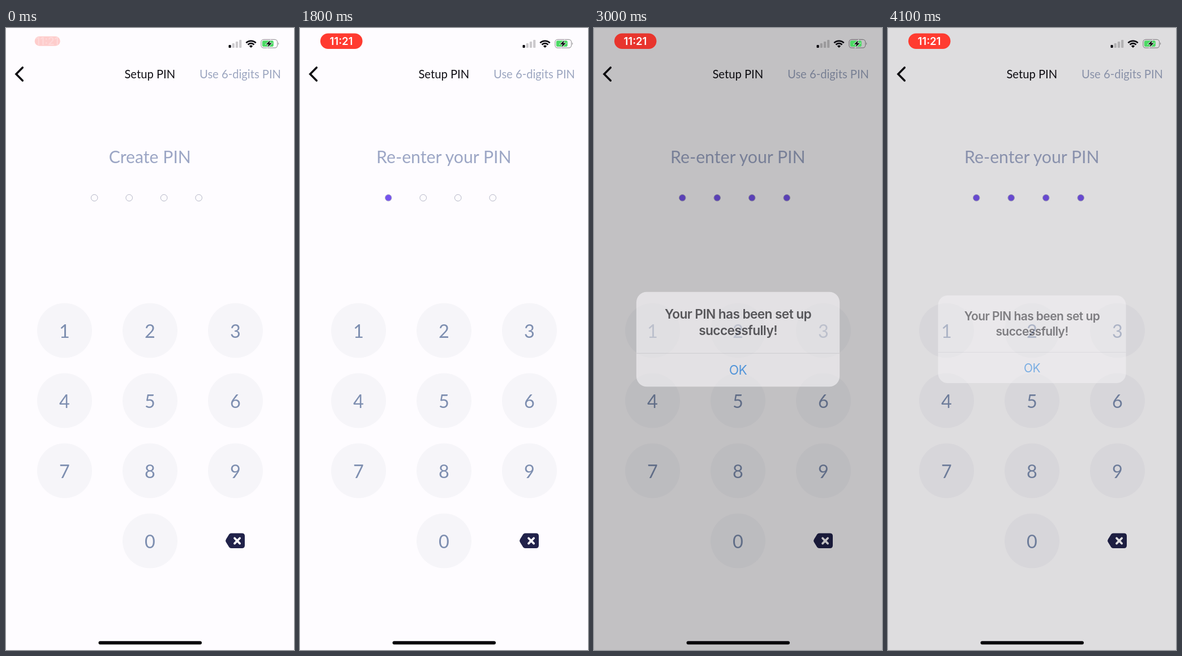
These frames come from a looping animation (509x1100 px, 4200 ms). An HTML page:

```html
<!DOCTYPE html>
<html lang="en">
<head>
<meta charset="utf-8">
<title>PIN setup</title>
<style>
  html, body { margin: 0; width: 100%; height: 100%; overflow: hidden; background: #fefcff; }
  svg { display: block; width: 509px; height: 1100px; }
  text { text-anchor: middle; font-family: Lato, sans-serif; }
  .ui { font-family: Inter, "Liberation Sans", sans-serif; }
  .alert { font-size: 20.9px; letter-spacing: -.52px; }
</style>
</head>
<body>
<svg viewBox="0 0 509 1100">
  <rect width="509" height="1100" fill="#fefcff"/>
  <path d="M29.3 70 18 81.5 29.3 93" fill="none" stroke="#0b0a10" stroke-width="3.6" stroke-linecap="round"/>
  <text x="254.3" y="88.6" font-size="20.2" fill="#0f0e14">Setup PIN</text>
  <text x="414" y="88.6" font-size="20.2" fill="#9ca6c0">Use 6-digits PIN</text>
  <text id="prompt" x="254.3" y="238.8" font-size="30.2" fill="#9ca6c5"></text>
  <g id="dots" stroke="#b3b5c6"></g>
  <g id="keys"></g>
  <path d="M398 893.5H417q5 0 5 5V915q0 5-5 5H398q-2.2 0-3.6-1.8L389 909.500q-1.800-2.700 0-5.400L394.400 895.300Q395.800 893.500 398 893.500Z" fill="#21224a"/>
  <path d="M404 902.200l9.200 9.400m0-9.400l-9.200 9.400" stroke="#fefcff" stroke-width="3.700" stroke-linecap="round"/>
  <rect id="dim" width="509" height="1100"/>

  <g id="alert">
    <rect x="88.500" y="473" width="332" height="155" rx="17" fill="#f9f7fa"/>
    <path id="pressed" d="M88.500 573H420.500V611a17 17 0 0 1-17 17H105.500a17 17 0 0 1-17-17Z" fill="#e9e8ea"/>
    <path id="divider" d="M88.500 573.500H420.500" stroke="#dcdadf"/>
    <g class="ui alert" font-weight="600" fill="#121116">
      <text class="ui" x="254.500" y="517">Your PIN has been set up</text>
      <text class="ui" x="254.500" y="544">successfully!</text>
    </g>
    <text class="ui alert" x="254.500" y="608.700" fill="#0878e8">OK</text>
  </g>

  <g id="pill">
    <rect id="pillBack" rx="14"/>
    <text id="clock" class="ui" x="73" y="30" font-size="18.500" font-weight="600" fill="#fff">11:21</text>
  </g>
  <g id="bars"></g>
  <g fill="none" stroke="#0b0a10" id="wifi"></g>
  <rect x="450.800" y="20.300" width="28.800" height="14.800" rx="4.600" fill="none" stroke="#000" stroke-opacity=".38" stroke-width="1.200"/>
  <path d="M481.200 25.300q2 2.300 0 4.800Z" fill="#000" fill-opacity=".45"/>
  <rect x="452.800" y="22.300" width="20" height="10.800" rx="2.800" fill="#4cd964"/>
  <path d="M467 21.800 459.500 28.700H464L462.300 34 470 26.800H465.500Z" fill="#0b0a10" stroke="#fefcff" stroke-width="1.300" paint-order="stroke"/>
  <rect x="163.500" y="1084.200" width="182.500" height="6" rx="3" fill="#08070b"/>
</svg>
<script>
const LOOP = 4200, STEP = 100;
const $ = id => document.getElementById(id);
const clamp = v => Math.max(0, Math.min(1, v));
const mix = (a, b, k) => a + (b - a) * k;

function add(parent, tag, attrs, text) {
  const el = document.createElementNS("http://www.w3.org/2000/svg", tag);
  set(el, attrs);
  if (text !== undefined) el.textContent = text;
  return parent.appendChild(el);
}
function set(el, attrs) {
  for (const name in attrs) el.setAttribute(name, attrs[name]);
}

// Keypad
[1, 2, 3, 4, 5, 6, 7, 8, 9, 0].forEach((digit, i) => {
  const x = 103.5 + 151 * (i === 9 ? 1 : i % 3);
  const y = 535 + 124 * Math.floor(i / 3);
  add($("keys"), "circle", { cx: x, cy: y, r: 48.5, fill: "#f6f5f9" });
  add($("keys"), "text", { x, y: y + 13.3, "font-size": 32.4, fill: "#7d8eb0" }, digit);
});

const dots = [0, 1, 2, 3].map(i =>
  add($("dots"), "circle", { cx: 156.2 + 61.5 * i, cy: 300.3, r: 5.8 }));

// Signal strength and wifi
for (let i = 0; i < 4; i++) {
  const height = 5 + 3 * i;
  add($("bars"), "rect", {
    x: 393.5 + 6.2 * i, y: 35 - height, width: 4.2, height, rx: 1,
    fill: i ? "#000" : "#0b0a10", "fill-opacity": i ? 0.2 : 1
  });
}
[[12.2, 2.8], [7.8, 2.7], [2.2, 4.4]].forEach(([r, width]) => {
  const d = r * Math.SQRT1_2;
  add($("wifi"), "path", {
    d: `M${433 - d} ${35 - d}A${r} ${r} 0 0 1 ${433 + d} ${35 - d}`, "stroke-width": width
  });
});

const FIRST = [400, 700, 900, 1200], SECOND = [1700, 2000, 2300, 2700];
const REENTER = 1300, OPEN = 3000, PRESS = 3900, CLOSE = 4100;

function drawPill(t) {
  const grow = clamp(t / 200);
  const w = mix(45, 74.5, grow), h = mix(17, 27.5, grow);
  set($("pillBack"), { x: 73.2 - w / 2, y: 23.3 - h / 2, width: w, height: h, rx: h / 2 });
  set($("pill"), { opacity: mix(0.24, 1, grow) });
  set($("clock"), { opacity: mix(0.25, 1, grow) });

  // The recording pill darkens briefly every 1.9 s
  const phase = (t + 1900 - 850) % 1900;
  const away = Math.min(phase, 1900 - phase);
  const dark = t < 200 ? 0 : clamp((410 - away) / 260);
  const rgb = [[255, 218], [59, 50], [48, 43]].map(([a, b]) => Math.round(mix(a, b, dark)));
  set($("pillBack"), { fill: `rgb(${rgb})` });
}

function drawAlert(t) {
  let dim = 0, opacity = 0, scale = 1;
  if (t >= CLOSE) {
    dim = 0.125;
    opacity = 0.46;
  } else if (t >= OPEN) {
    const rest = Math.pow(0.22, (t - OPEN) / STEP);
    dim = 0.395 - 0.16 * rest;
    scale = 1 + 0.082 * rest;
    opacity = t < OPEN + STEP ? 0.6 : 1;
  }
  const pressed = t >= PRESS && t < CLOSE;
  set($("dim"), { opacity: dim });
  set($("alert"), {
    opacity,
    transform: `translate(254.5 550.5) scale(${scale}) translate(-254.5 -550.5)`
  });
  set($("pressed"), { opacity: pressed ? 1 : 0 });
  set($("divider"), { opacity: pressed ? 0 : 1 });
}

function draw(t) {
  const again = t >= REENTER;
  const count = (again ? SECOND : FIRST).filter(at => t >= at).length;
  $("prompt").textContent = again ? "Re-enter your PIN" : "Create PIN";
  dots.forEach((dot, i) => set(dot, { fill: i < count ? "#7653ee" : "#fefcff" }));
  drawPill(t);
  drawAlert(t);
}

const start = performance.now();
function tick() {
  const t = (performance.now() - start) % LOOP;
  draw(Math.floor(t / STEP) * STEP);
  requestAnimationFrame(tick);
}
tick();
</script>
</body>
</html>
```
